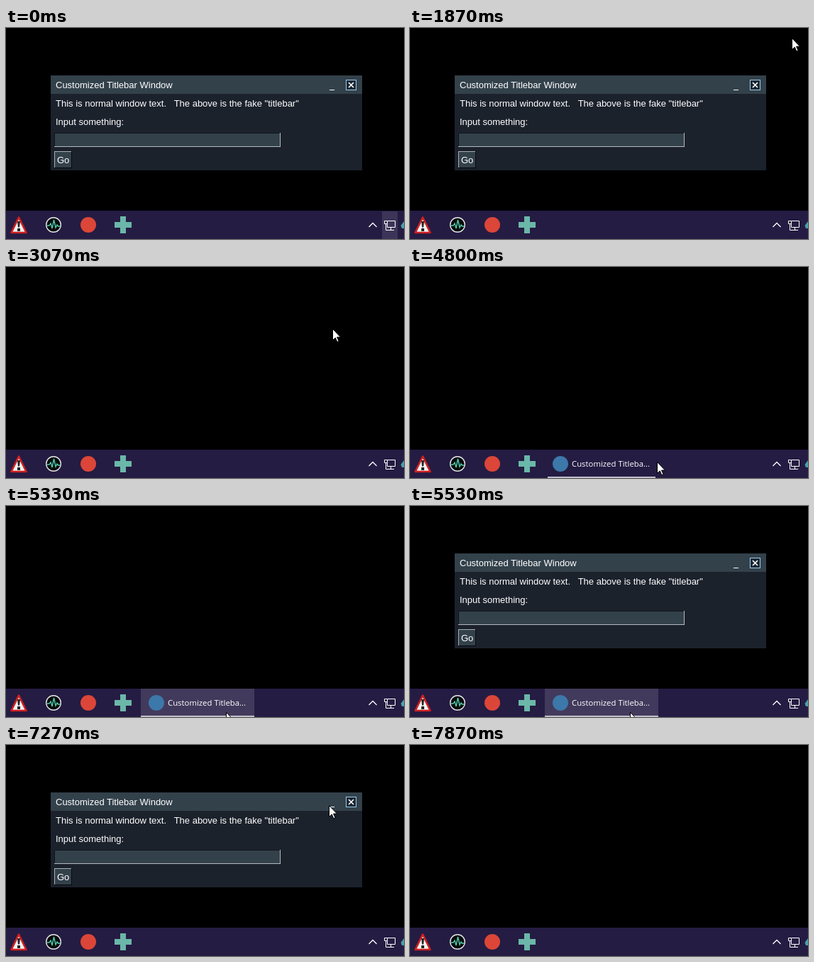
Write an HTML page that moves like this. It is 561 px wide and 298 px high and loops after 8000 ms.

```html
<!DOCTYPE html>
<html lang="en">
<head>
<meta charset="utf-8">
<title>Custom titlebar demo</title>
<style>
  html, body { margin: 0; width: 100%; height: 100%; overflow: hidden; background: #000; }
  svg { display: block; width: 561px; height: 298px; }
  rect { shape-rendering: crispEdges; }
  text { fill: #fff; white-space: pre; }
  #window text { font: 13px "Liberation Sans", Arial, sans-serif; }
  #label text { font: 11.35px "Open Sans", "Noto Sans", sans-serif; }
  .line { fill: none; stroke: #fff; }
</style>
</head>
<body>
<svg viewBox="0 0 561 298" xmlns="http://www.w3.org/2000/svg">
  <rect width="561" height="298"/>

  <g id="window">
    <rect x="63" y="67" width="439" height="134" fill="#1c222c"/>
    <rect x="63" y="67" width="439" height="26" fill="#33414b"/>
    <text x="70" y="85">Customized Titlebar Window</text>
    <rect x="456" y="87" width="7" height="1" fill="#fff"/>
    <rect x="479" y="73" width="15" height="15" fill="#9dcbea"/>
    <rect x="480" y="74" width="13" height="13" fill="#1b2834"/>
    <path class="line" d="M483 77l7 7m0-7l-7 7" stroke-width="1.6"/>
    <text x="70" y="111">This is normal window text.   The above is the fake "titlebar"</text>
    <text x="70" y="137">Input something:</text>
    <rect x="68" y="148" width="319" height="20" fill="#b4b9bd"/>
    <rect x="68" y="148" width="318" height="19" fill="#10151b"/>
    <rect x="69" y="149" width="317" height="18" fill="#33414b"/>
    <rect x="68" y="174" width="25" height="24" fill="#06090c"/>
    <rect x="68" y="174" width="24" height="23" fill="#a9b0b5"/>
    <rect x="69" y="175" width="23" height="22" fill="#33414b"/>
    <text x="72" y="191">Go</text>
  </g>

  <rect y="258" width="561" height="40" fill="#251c43"/>

  <g id="pinned">
    <path d="M18 267.5L28.5 289h-21z" fill="#f1f1f1" stroke="#cf2020" stroke-width="2.6" stroke-linejoin="round"/>
    <path d="M16 273h4l-1 8.5h-2z" fill="#222"/>
    <rect x="16" y="283" width="4" height="4" fill="#222"/>
    <circle cx="67" cy="278" r="10.3" fill="#080b0d" stroke="#e4e7e8" stroke-width="1.4"/>
    <path d="M58 279h3l2-3 2 7 2.5-12 2.5 11 2-4 1.5 2h3" fill="none" stroke="#55d3b0" stroke-width="1.3"/>
    <circle cx="116" cy="278" r="11" fill="#dc4638"/>
    <path d="M161 266h8v8h8v8h-8v8h-8v-8h-8v-8h8z" fill="#6bb7a9"/>
  </g>

  <g id="button">
    <rect id="hover" x="190" y="258" width="160" height="40" fill="#423a5c"/>
    <g id="label">
      <circle cx="212" cy="278" r="11" fill="#3c78a9"/>
      <text x="228" y="282">Customized Titleba...</text>
    </g>
    <rect id="underline" y="296" height="2" fill="#c0bcc9"/>
  </g>

  <g id="tray">
    <rect id="trayHover" x="530" y="259" width="22" height="39" fill="#3d3558"/>
    <path class="line" d="M511.5 281l5.5-5.5 5.5 5.5" stroke-width="1.3"/>
    <path class="line" d="M538 272.5h10.500v9h-11v-5M542.500 282v3.500M538 285.500h9M535.500 277v8.500h3M533.500 272.500h4v4h-4z"/>
    <path d="M556.500 279l4.500-6v10h-3z" fill="#4ba0ad"/>
  </g>

  <path id="cursor" d="M.5.5v16l3.700-3.600 2.600 5.800 2.300-1-2.600-5.600h5z" fill="#fff" stroke="#000"/>
</svg>
<script>
const LOOP = 8000, TICK = 1000 / 15;
const el = id => document.getElementById(id);
const clamp = v => Math.max(0, Math.min(1, v));
const ramp = (t, from, to) => clamp((t - from) / (to - from));
const easeOut = u => 1 - (1 - u) ** 2;
const show = (id, on) => el(id).setAttribute("display", on ? "inline" : "none");
const set = (id, attrs) => {
  for (const key in attrs) el(id).setAttribute(key, attrs[key]);
};

// Pointer strokes in ticks: start, arrival, hidden or replaced at, then two points
const strokes = [
  [28, 35, 42, 538, 14, 460, 89],
  [42, 42, 49, 460, 87, 460, 87],
  [49, 50, 51, 464, 125, 475, 225],
  [72, 75, 85, 348, 275, 310, 291],
  [88, 88, 89, 444, 284, 444, 284],
  [95, 102, 104, 553, 147, 463, 100],
  [104, 109, 116, 463, 100, 455, 85],
  [116, 117, 118, 482, 98, 532, 125]
];

function drawCursor(t) {
  const stroke = strokes.find(([start, , until]) => t >= start && t < until);
  show("cursor", stroke);
  if (!stroke) return;
  const [start, end, , x0, y0, x1, y1] = stroke;
  const u = end > start ? easeOut(ramp(t, start, end)) : 1;
  const x = Math.round(x0 + (x1 - x0) * u), y = Math.round(y0 + (y1 - y0) * u);
  set("cursor", { transform: `translate(${x} ${y})` });
}

function drawButton(t) {
  show("button", t >= 49 && t < 91);
  const enter = t < 55 ? 0.9 * ramp(t, 48, 51) : 1;
  const leave = ramp(t, 87, 91);
  const hover = ramp(t, 72, 75);
  const scale = t >= 78 && t < 80 ? 0.95 : 1;
  const drop = 10 * (1 - enter) + 10 * leave;
  const inset = 4 * (1 - hover);
  set("button", { opacity: enter * (1 - leave) });
  set("hover", { opacity: hover });
  set("label", { transform: `translate(270 ${278 + drop}) scale(${scale}) translate(-270 -278)` });
  set("underline", { x: 190 + inset, width: 160 - 2 * inset });
}

function draw(ms) {
  const t = Math.floor((ms % LOOP + 4) / TICK);
  show("window", t < 46 || (t >= 83 && t < 113));
  show("trayHover", t < 4);
  drawButton(t);
  drawCursor(t);
}

const begin = performance.now();
function loop() {
  draw(performance.now() - begin);
  requestAnimationFrame(loop);
}
loop();
</script>
</body>
</html>
```
